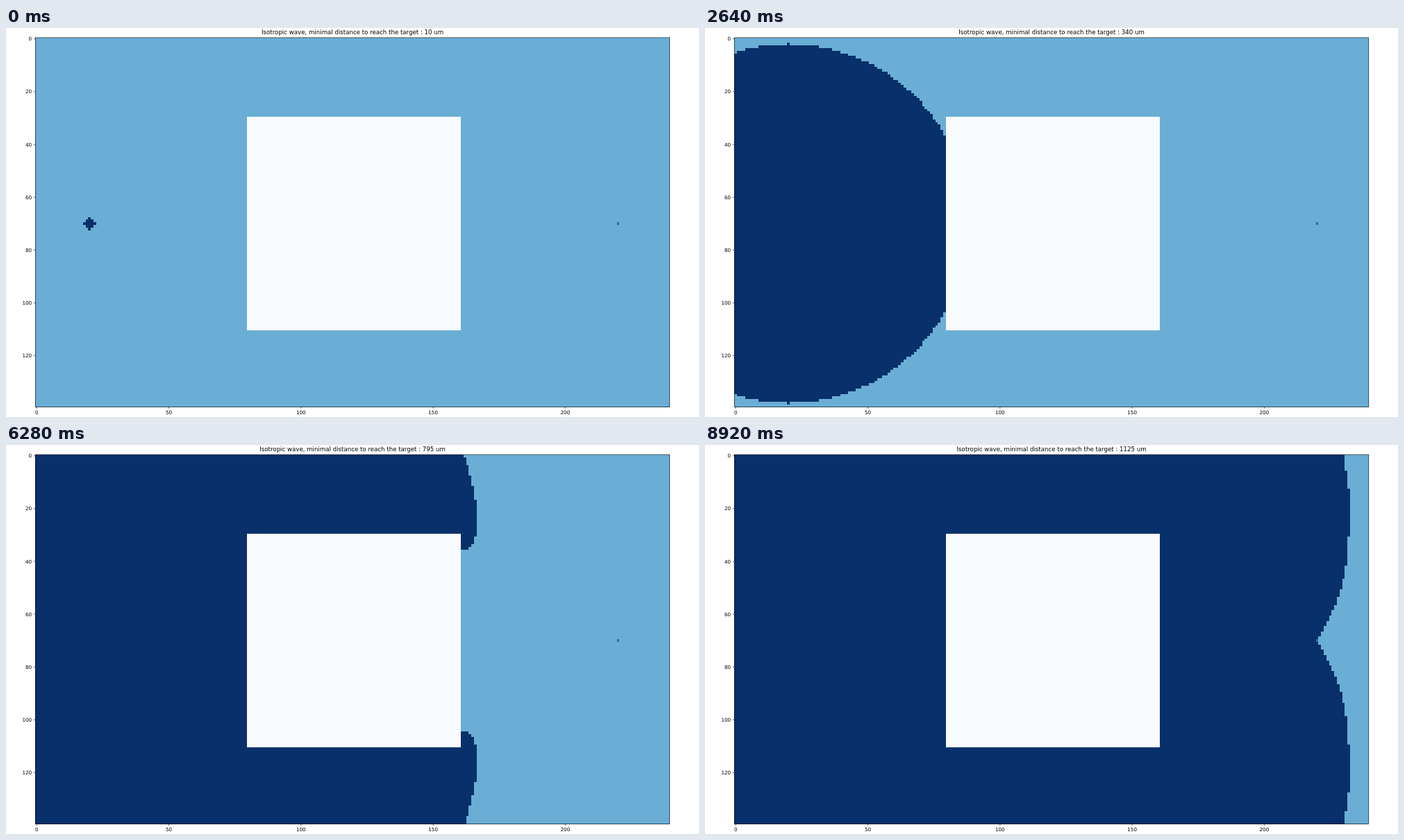
These frames come from a looping animation (998x561 px, 9.6 s). An HTML page:

```html
<!DOCTYPE html>
<html lang="en">
<head>
<meta charset="utf-8">
<title>Isotropic wave</title>
<style>
  html, body { margin: 0; width: 100%; height: 100%; overflow: hidden; background: #fff; }
  svg { display: block; width: 998px; height: 561px; font: 7.22px "DejaVu Sans", sans-serif; }
  #title { font-size: 8.65px; }
  #cells { shape-rendering: crispEdges; }
</style>
</head>
<body>
<svg viewBox="0 0 998 561">
  <g id="cells" transform="translate(42.3 13.8) scale(3.806)">
    <rect width="240" height="140" fill="#6aaed6"/>
    <path id="wave" fill="#08306b"/>
    <rect x="80" y="30" width="81" height="81" fill="#f7fbff"/>
    <rect x="220" y="70" width="1" height="1" fill="#2070b4"/>
  </g>
  <g id="axes" stroke="#000" stroke-width=".6" fill="none">
    <rect x="42.3" y="13.9" width="913.5" height="532.6"/>
  </g>
  <g id="labels"></g>
  <text id="title" x="499.1" y="9.4" text-anchor="middle"></text>
</svg>
<script>
const W = 240, H = 140, STEP = 40, LOOP = 9600, LAST = 223;
const $ = id => document.getElementById(id);

function add(parent, tag, attrs, text = '') {
  const el = document.createElementNS('http://www.w3.org/2000/svg', tag);
  for (const key in attrs) el.setAttribute(key, attrs[key]);
  el.textContent = text;
  $(parent).append(el);
}

const place = (start, n) => start + (n + 0.5) * 3.806;
for (let n = 0; n <= 200; n += 50) {
  const x = place(42.3, n);
  add('axes', 'path', { d: `M${x} 546.5v2.5` });
  add('labels', 'text', { x, y: 557, 'text-anchor': 'middle' }, n);
}
for (let n = 0; n <= 120; n += 20) {
  const y = place(13.8, n);
  add('axes', 'path', { d: `M42.3 ${y}h-2.5` });
  add('labels', 'text', { x: 37.2, y: y + 2.6, 'text-anchor': 'end' }, n);
}

// Path length from the emitter, bending round the near and far corners of the block
function arrival(x, y) {
  const v = Math.abs(y - 70);
  let d = Infinity;
  if (x < 80 || 2 * (x - 20) <= 3 * v) d = Math.hypot(x - 20, v);
  if (x >= 80 && v > 40) d = Math.min(d, 72 + Math.hypot(x - 80, v - 40));
  if (x > 160) d = Math.min(d, 153 + Math.hypot(x - 160, v - 40));
  return d - 1e-9;
}
const rows = Array.from({ length: H }, (_, y) =>
  Array.from({ length: W }, (_, x) => arrival(x, y)));

let shown = -1;
function draw(now) {
  const step = Math.min(LAST, Math.floor((now % LOOP) / STEP));
  if (step !== shown) {
    shown = step;
    const radius = step + 2, reached = d => d <= radius;
    let path = '';
    rows.forEach((row, y) => {
      const from = row.findIndex(reached);
      if (from < 0) return;
      const to = row.findLastIndex(reached) + 1;
      path += `M${from} ${y}H${to}v1H${from}z`;
    });
    $('wave').setAttribute('d', path);
    $('title').textContent =
      `Isotropic wave, minimal distance to reach the target : ${radius * 5} um`;
  }
  requestAnimationFrame(() => draw(performance.now()));
}
draw(0);
</script>
</body>
</html>
```
